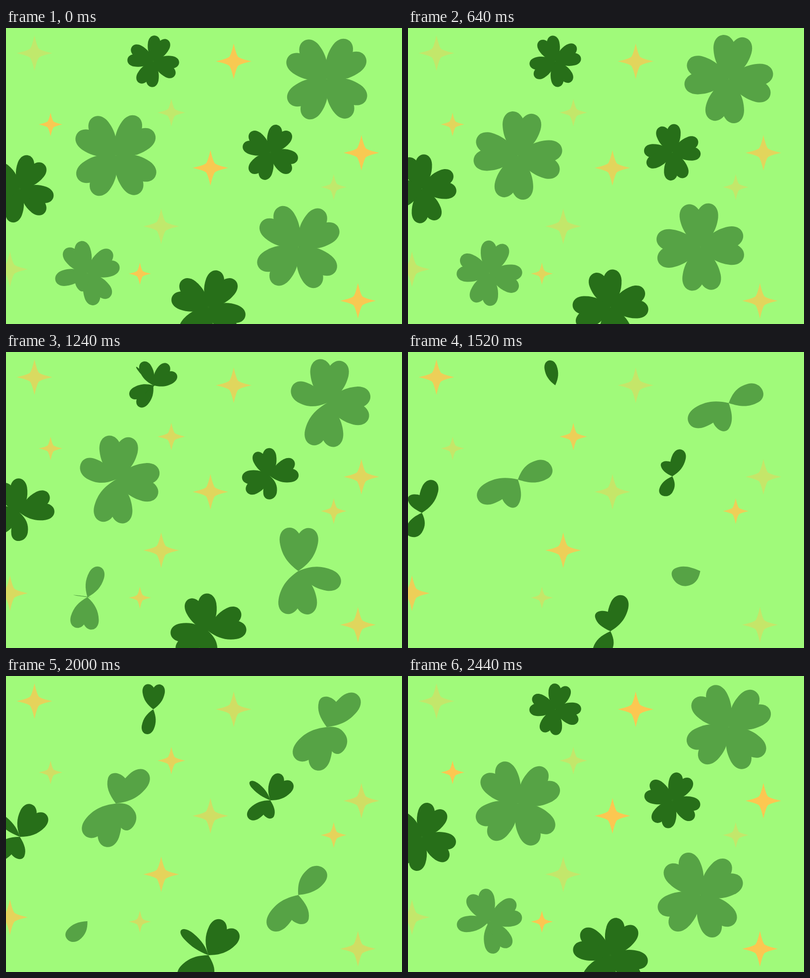
An HTML page with a canvas that plays this animation: 800x600 px, repeating every 2480 ms.

```html
<!DOCTYPE html>
<html lang="en">
<head>
<meta charset="utf-8">
<title>Clovers</title>
<style>
  html, body { margin: 0; width: 100%; height: 100%; overflow: hidden; background: #a0fa7a; }
  canvas { display: block; }
</style>
</head>
<body>
<canvas id="stage" width="800" height="600"></canvas>
<script>
const ctx = document.getElementById('stage').getContext('2d');
const PERIOD = 2480, HALF = PERIOD / 2, START = 780;
const GREEN = '#56a345', DARK = '#276f19', GOLD = '#fcc751';
const LOBE = new Path2D('M0 0C21 17 40 24.5 66 21.8C80.5 20 90.2 11.5 90.2 0' +
  'C90.2-11.5 80.5-20 66-21.8C40-24.5 21-17 0 0Z');
const STAR = new Path2D('M0-36Q5-14 9-9Q14-5 36 0Q14 5 9 9Q5 14 0 36' +
  'Q-5 14-9 9Q-14 5-36 0Q-14-5-9-9Q-5-14 0-36Z');

// Heading of the leading leaf, in degrees, at the times in TURN_AT.
const TURN_AT = [180, 300, 460, 740, 820, 1140];
const kinds = [
  { color: GREEN, delay: 0, turn: [222, 241, 265, 307, 325, 362],
    places: [[648, 103.5, 1], [222, 258.5, 1]] },
  { color: GREEN, delay: 120, turn: [223, 246, 269, 305, 317, 378],
    places: [[590.5, 444, 1]] },
  { color: GREEN, delay: 220, turn: [228, 243, 263, 293, 302, 361],
    places: [[164.5, 497, .735]] },
  { color: DARK, delay: 5, narrow: true, turn: [86, 55, 18, -26, -33, -94],
    places: [[534, 252, .635], [28, 326, .775], [409, 566, .85]] },
  { color: DARK, delay: 80, narrow: true, turn: [120, 89, 40, -14, -23, -83],
    places: [[297.5, 67.5, .58]] }
];

const FADE_AT = [0, 180, 460, 740, 820, 1140];
const stars = [
  { alpha: [.25, .4, .7, 1, .92, .65], places: [
    [460, 67.5, 1], [90, 195.5, .66], [413, 283.5, 1],
    [718, 253, 1], [270.5, 498, .62], [711, 553, 1]] },
  { alpha: [1, .84, .62, .38, .31, .4], places: [
    [57.5, 51, 1], [334, 171.5, .77], [662, 322.5, .72],
    [313.5, 402, 1], [8, 489, 1]] }
];

const clamp = x => Math.max(0, Math.min(1, x));
const rotate = degrees => ctx.rotate(-degrees * Math.PI / 180);

// Piecewise linear, continued past both ends.
function interpolate(xs, ys, x) {
  let i = 0;
  while (i < xs.length - 2 && x > xs[i + 1]) i++;
  return ys[i] + (ys[i + 1] - ys[i]) * (x - xs[i]) / (xs[i + 1] - xs[i]);
}

function at(x, y, scale, draw) {
  ctx.save();
  ctx.translate(x, y);
  ctx.scale(scale, scale);
  draw();
  ctx.restore();
}

// A lobe is half a heart; it unfolds along or across the axis of its heart.
function drawLobe(heading, k, grown, narrow) {
  if (!grown) return;
  ctx.save();
  rotate(heading + (k > 1 ? 90 : 0));
  if (narrow) ctx.scale(1, grown);
  else ctx.scale(grown, 1);
  rotate(k % 2 ? 15.5 : -15.5);
  ctx.fill(LOBE);
  ctx.restore();
}

function drawClover(kind, u) {
  const heading = interpolate(TURN_AT, kind.turn, u);
  const v = u - kind.delay;
  for (let k = 0; k < 4; k++) {
    drawLobe(heading, k, clamp((v - 120 * k) / 100), kind.narrow && k > 1);
    drawLobe(heading + 180, k, clamp((v - 100 - 137 * k) / 100));
  }
}

function render(time) {
  const phase = (time + START) % PERIOD;
  const u = phase < HALF ? phase : PERIOD - phase;
  ctx.fillStyle = '#a0fa7a';
  ctx.fillRect(0, 0, 800, 600);
  for (const kind of kinds) {
    ctx.fillStyle = kind.color;
    for (const place of kind.places) at(...place, () => drawClover(kind, u));
  }
  ctx.fillStyle = GOLD;
  for (const group of stars) {
    ctx.globalAlpha = clamp(interpolate(FADE_AT, group.alpha, u));
    for (const place of group.places) at(...place, () => ctx.fill(STAR));
  }
  ctx.globalAlpha = 1;
}

const begin = performance.now();
function tick() {
  render(performance.now() - begin);
  requestAnimationFrame(tick);
}
tick();
</script>
</body>
</html>
```
